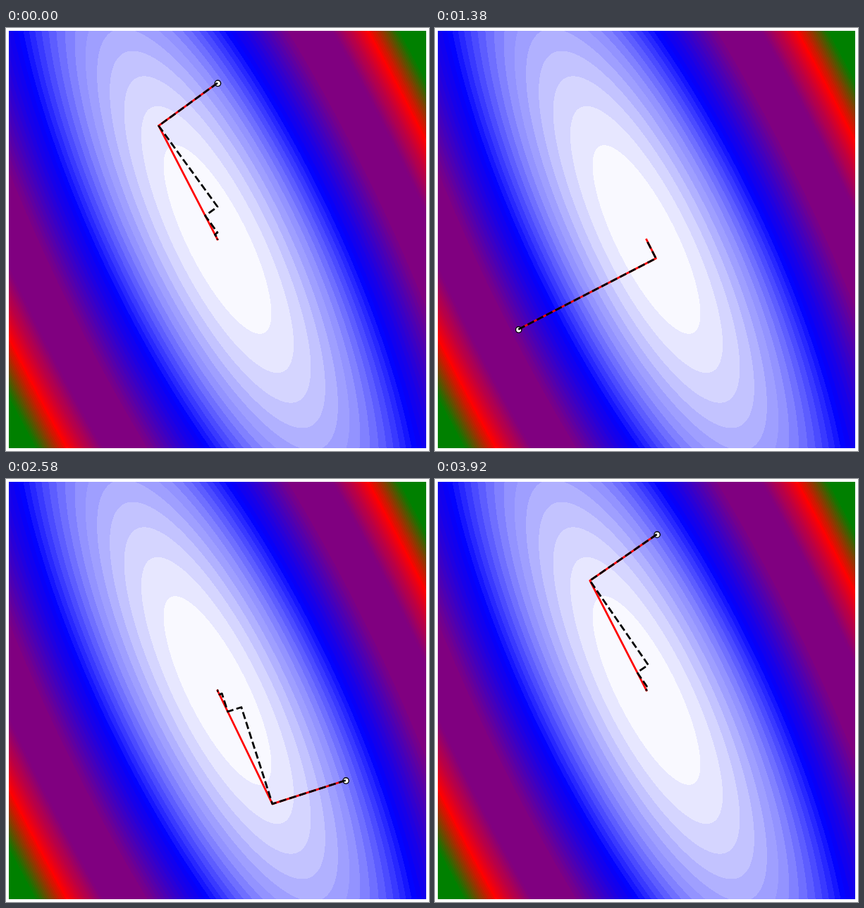
These frames come from a looping animation (600 by 600 pixels, 3960 ms). An HTML page with a canvas:

```html
<!DOCTYPE html>
<html lang="en">
<head>
<meta charset="utf-8">
<title>Steepest descent and conjugate gradients</title>
<style>
html, body { margin: 0; width: 600px; height: 600px; overflow: hidden; background: #fff; }
canvas { display: block; }
</style>
</head>
<body>
<canvas id="stage" width="600" height="600"></canvas>
<script>
const SIZE = 600, MARGIN = 4, MID = 300, UNIT = 148;
const FRAMES = 95, LOOP = 3960, START_RADIUS = 1.5;
const LEVELS = 88, SHADES = 256;
const PT = 100 / 72;
// white, blue, purple, purple, red, green, green
const STOPS = [[255, 255, 255], [0, 0, 255], [128, 0, 128], [128, 0, 128],
  [255, 0, 0], [0, 128, 0], [0, 128, 0]];

const ctx = document.getElementById('stage').getContext('2d');

// The quadratic form x'Ax has eigenvalues 12 and 1 along (2,-1) and (1,2).
const times = ([x, y]) => [(49 * x - 22 * y) / 5, (16 * y - 22 * x) / 5];
const dot = (a, b) => a[0] * b[0] + a[1] * b[1];

function shade(level) {
  const index = Math.floor((level + 0.5) / LEVELS * SHADES);
  const pos = index / (SHADES - 1) * (STOPS.length - 1);
  const i = Math.min(Math.floor(pos), STOPS.length - 2);
  return STOPS[i].map((c, j) => Math.round(c + (STOPS[i + 1][j] - c) * (pos - i)));
}

function paintField() {
  const shades = Array.from({ length: LEVELS }, (_, level) => shade(level));
  const image = ctx.createImageData(SIZE, SIZE);
  image.data.fill(255);
  for (let y = MARGIN; y < SIZE - MARGIN; y++) {
    for (let x = MARGIN; x < SIZE - MARGIN; x++) {
      const p = [(x + 0.5 - MID) / UNIT, (y + 0.5 - MID) / UNIT];
      image.data.set(shades[Math.floor(dot(p, times(p)))], (y * SIZE + x) * 4);
    }
  }
  return image;
}

const field = paintField();

// Exact line search along the negative gradient.
function descend(p) {
  const g = times(p), size = dot(g, times(g));
  const step = size ? dot(g, g) / size : 0;
  return [p[0] - step * g[0], p[1] - step * g[1]];
}

function drawPath(points, color, cap, dash) {
  ctx.beginPath();
  for (const [x, y] of points) ctx.lineTo(MID + x * UNIT, MID + y * UNIT);
  ctx.strokeStyle = color;
  ctx.lineWidth = 2 * PT;
  ctx.lineJoin = 'round';
  ctx.lineCap = cap;
  ctx.setLineDash(dash);
  ctx.stroke();
}

function drawMarker([x, y]) {
  const shift = MID + 0.45;
  ctx.beginPath();
  ctx.arc(shift + x * UNIT, shift + y * UNIT, 3 * PT, 0, 2 * Math.PI);
  ctx.fillStyle = '#fff';
  ctx.fill();
  ctx.strokeStyle = '#000';
  ctx.lineWidth = PT;
  ctx.setLineDash([]);
  ctx.stroke();
}

function draw() {
  // 24 frames a second, with starts rounded to hundredths of a second
  const hundredths = Math.floor(performance.now() % LOOP / 10);
  const frame = Math.ceil((hundredths + 0.5) * 6 / 25) - 1;
  const angle = 2 * Math.PI * frame / FRAMES;
  const start = [-START_RADIUS * Math.sin(angle), -START_RADIUS * Math.cos(angle)];

  const steepest = [start];
  for (let i = 0; i < 25; i++) steepest.push(descend(steepest[i]));

  ctx.putImageData(field, 0, 0);
  drawPath([start, steepest[1], [0, 0]], '#f00', 'square', []);
  drawMarker(start);
  drawPath(steepest, '#000', 'butt', [7.4 * PT, 3.2 * PT]);
  requestAnimationFrame(draw);
}

draw();
</script>
</body>
</html>
```
